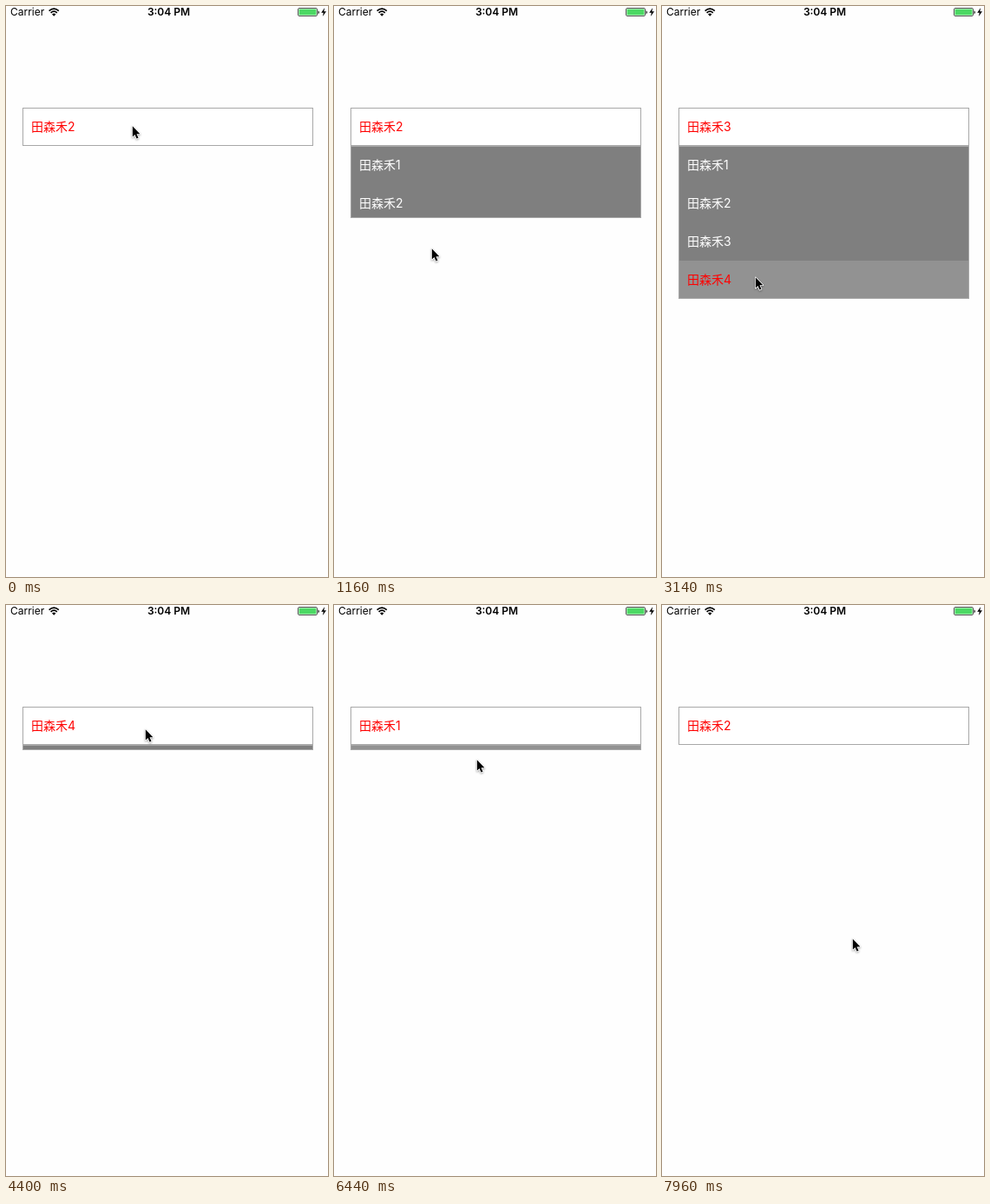
Recreate the animation shown at these times as an HTML page. Size 371 by 657 pixels, loop 7.99 s.

```html
<!DOCTYPE html>
<html lang="zh">
<head>
<meta charset="utf-8">
<title>Dropdown</title>
<style>
  html, body { margin: 0; width: 100%; height: 100%; overflow: hidden; background: #fefefe; }
  body { position: relative; font: 14px/44px Inter, "Noto Sans CJK SC", "Noto Sans CJK", sans-serif; }
  body > * { position: absolute; box-sizing: border-box; }
  .status { top: 0; font-size: 12px; line-height: 14px; color: #000; white-space: pre; }
  #carrier { left: 5px; }
  #clock { left: 0; width: 375px; text-align: center; font-weight: 600; }
  #icons { left: 0; top: 0; }
  #field, #menu { left: 19px; width: 335px; border: 1px solid #a8a8a8; }
  #field { top: 117px; height: 44px; background: #fff; color: #f00; padding-left: 9px; line-height: 42px; }
  #menu { top: 161px; overflow: hidden; background: #7f7f7f; }
  #rows { position: absolute; left: 0; top: -1px; width: 100%; }
  #rows div { height: 44px; padding-left: 9px; color: #fff; }
  #rows .on { background: #929292; color: #f00; }
  #cursor { left: 0; top: 0; overflow: visible; filter: drop-shadow(0 1px 1px rgba(0, 0, 0, .35)); }
</style>
</head>
<body>
  <div class="status" id="carrier">Carrier</div>
  <div class="status" id="clock">3:04 PM</div>
  <svg id="icons" width="371" height="16">
    <g fill="none" stroke="#000" stroke-width="1.7">
      <path d="M49.6 5.6Q55.2 .6 60.8 5.6M51.6 7.8Q55.2 4.6 58.8 7.8"/>
    </g>
    <path d="M53 9.5Q55.2 7.7 57.4 9.5L55.2 11.8Z"/>
    <rect x="336.5" y="2.5" width="22" height="9" rx="1.5" fill="#fff" stroke="#555"/>
    <rect x="337.5" y="3.5" width="20" height="7" rx=".5" fill="#4cd964"/>
    <path d="M359.5 5.2q1.5.3 1.5 2t-1.5 2z" fill="#333"/>
    <path d="M367.2 2L363.2 7.8H365.8L364.8 12L369 6.2H366.3Z"/>
  </svg>
  <div id="field"></div>
  <div id="menu"><div id="rows"></div></div>
  <svg id="cursor" width="12" height="18">
    <path d="M.8 1.3V13.6L3.5 11L5.5 15.6L7.5 14.7L5.5 10.2H9.4Z"
      stroke="#fff" stroke-width="1.6" paint-order="stroke" stroke-linejoin="round"/>
  </svg>
<script>
  const LOOP = 7990, ROW = 44, SLIDE = 200, NAME = '田森禾';
  const el = id => document.getElementById(id);
  const field = el('field'), menu = el('menu'), cursor = el('cursor');

  const ease = {
    both: p => p * p * (3 - 2 * p),
    in: p => p * p,
    out: p => 1 - (1 - p) ** 2,
    line: p => p
  };

  // open start, tap on a row, close start, row tapped
  const rounds = [
    [64, 1040, 1057.5, 3],
    [2124, 3140, 3180, 4],
    [4379, 5560, 5590, 1],
    [6419, 6980, 7010, 2]
  ];

  // time, x, y, easing towards this point
  const path = [
    [0, 145, 137],
    [200, 145, 137],
    [740, 112, 278, 'both'],
    [1160, 112, 278],
    [1810, 147, 142, 'both'],
    [1925, 147, 142],
    [1960, 145, 141, 'line'],
    [2240, 145, 141],
    [2780, 107, 311, 'both'],
    [3260, 107, 311],
    [3920, 160, 136, 'both'],
    [4370, 160, 136],
    [4400, 160, 142, 'in'],
    [5170, 116, 209, 'both'],
    [5320, 126, 184, 'both'],
    [5620, 126, 184],
    [6200, 160, 143, 'both'],
    [6330, 160, 143],
    [6440, 164, 177, 'in'],
    [6830, 140, 222, 'out'],
    [7050, 140, 222],
    [7770, 230, 440, 'both'],
    [7790, 232, 446, 'line'],
    [7960, 219, 383, 'both']
  ];

  const rows = [1, 2, 3, 4].map(n => {
    const row = document.createElement('div');
    row.textContent = NAME + n;
    el('rows').append(row);
    return row;
  });

  const slide = (t, start) => ease.both(Math.min(1, Math.max(0, (t - start) / SLIDE)));

  function pointAt(t) {
    const i = path.findIndex(k => k[0] > t);
    if (i < 0) return path[path.length - 1].slice(1, 3);
    const a = path[i - 1], b = path[i];
    const p = ease[b[3] || 'line']((t - a[0]) / (b[0] - a[0]));
    return [1, 2].map(c => a[c] + (b[c] - a[c]) * p);
  }

  function draw(t) {
    let height = 0, picked = 2, shown = 2;
    for (const [open, tap, close, row] of rounds) {
      height += slide(t, open) - slide(t, close);
      if (t >= tap) picked = row;
      if (t >= close + SLIDE) shown = row;
    }
    height = Math.round(height * ROW * rows.length);
    menu.style.height = height + 'px';
    menu.style.visibility = height > 0 ? 'visible' : 'hidden';
    rows.forEach((row, i) => row.classList.toggle('on', i + 1 === picked));
    field.textContent = NAME + shown;
    const [x, y] = pointAt(t).map(Math.round);
    cursor.style.transform = `translate(${x}px, ${y}px)`;
  }

  const start = performance.now();
  function tick() {
    draw((performance.now() - start) % LOOP);
    requestAnimationFrame(tick);
  }
  tick();
</script>
</body>
</html>
```
